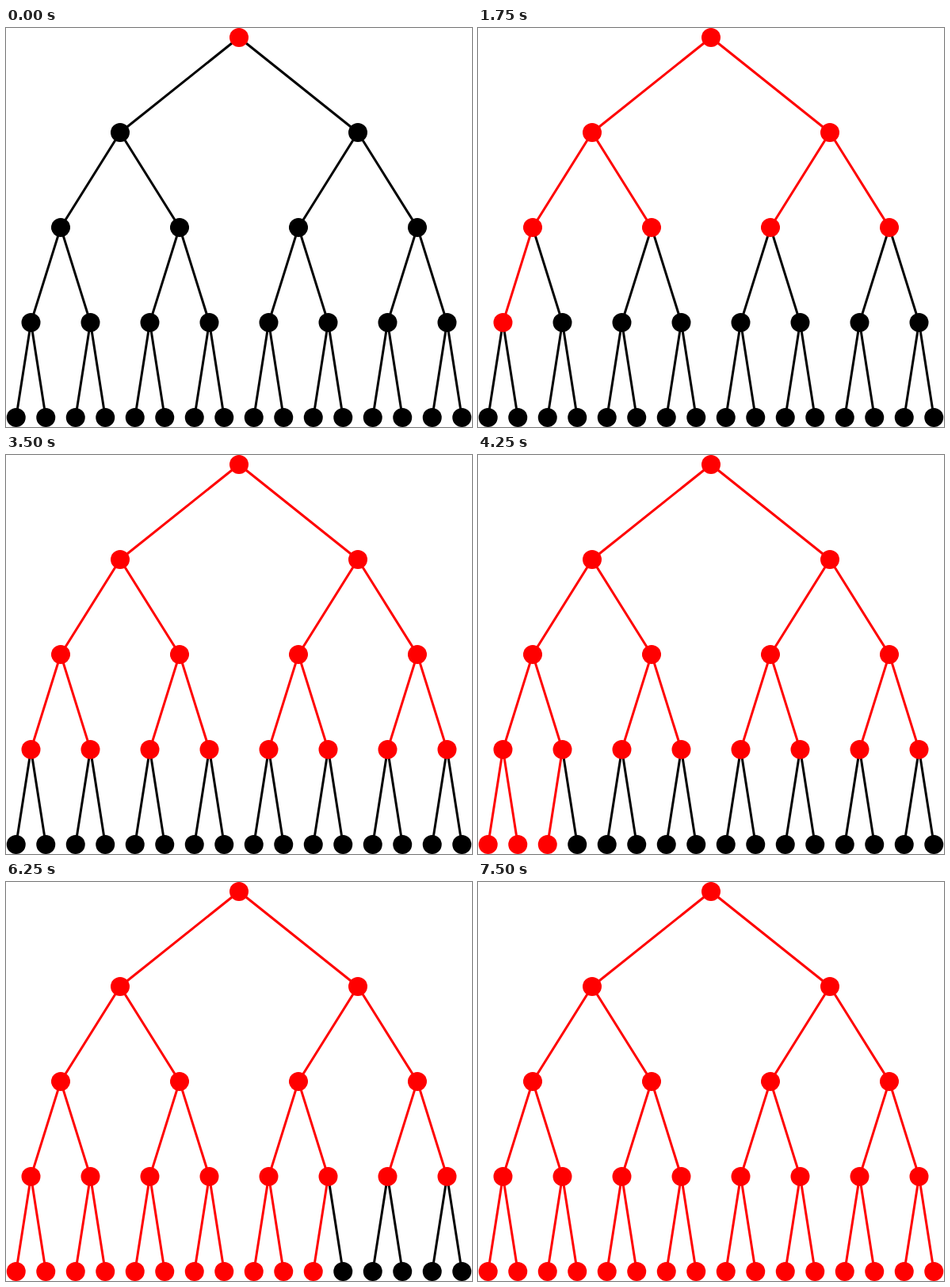
An HTML page that plays this animation: 588x504 px, repeating every 7.75 s.

```html
<!DOCTYPE html>
<html lang="en">
<head>
<meta charset="utf-8">
<title>Breadth-first traversal</title>
<style>
  html, body { margin: 0; width: 100%; height: 100%; overflow: hidden; background: #fff; }
  svg { display: block; width: 588px; height: 504px; }
  line { stroke: #000; stroke-width: 3; }
  circle { fill: #000; }
  line.on { stroke: #f00; }
  circle.on { fill: #f00; }
</style>
</head>
<body>
<svg viewBox="0 0 588 504"><g id="edges"></g><g id="nodes"></g></svg>
<script>
const COUNT = 31, STEP = 250, RADIUS = 12;

// Heap order: node k has children 2k + 1 and 2k + 2.
function place(k) {
  const depth = Math.floor(Math.log2(k + 1));
  const width = 2 ** depth;
  return { x: 600 * (k + 1.5 - width) / width - 6, y: 12 + 120 * depth };
}

function add(parent, tag, attrs) {
  const el = document.createElementNS("http://www.w3.org/2000/svg", tag);
  for (const name in attrs) el.setAttribute(name, attrs[name]);
  return document.getElementById(parent).appendChild(el);
}

const parts = Array.from({ length: COUNT }, (_, k) => {
  const p = place(k);
  const group = [add("nodes", "circle", { cx: p.x, cy: p.y, r: RADIUS })];
  if (k > 0) {
    const q = place((k - 1) >> 1);
    group.push(add("edges", "line", { x1: q.x, y1: q.y, x2: p.x, y2: p.y }));
  }
  return group;
});

function draw(time) {
  const current = Math.floor(time / STEP) % COUNT;
  parts.forEach((group, k) => {
    for (const el of group) el.classList.toggle("on", k <= current);
  });
}

const start = performance.now();
function tick() {
  draw(performance.now() - start);
  requestAnimationFrame(tick);
}
tick();
</script>
</body>
</html>
```
